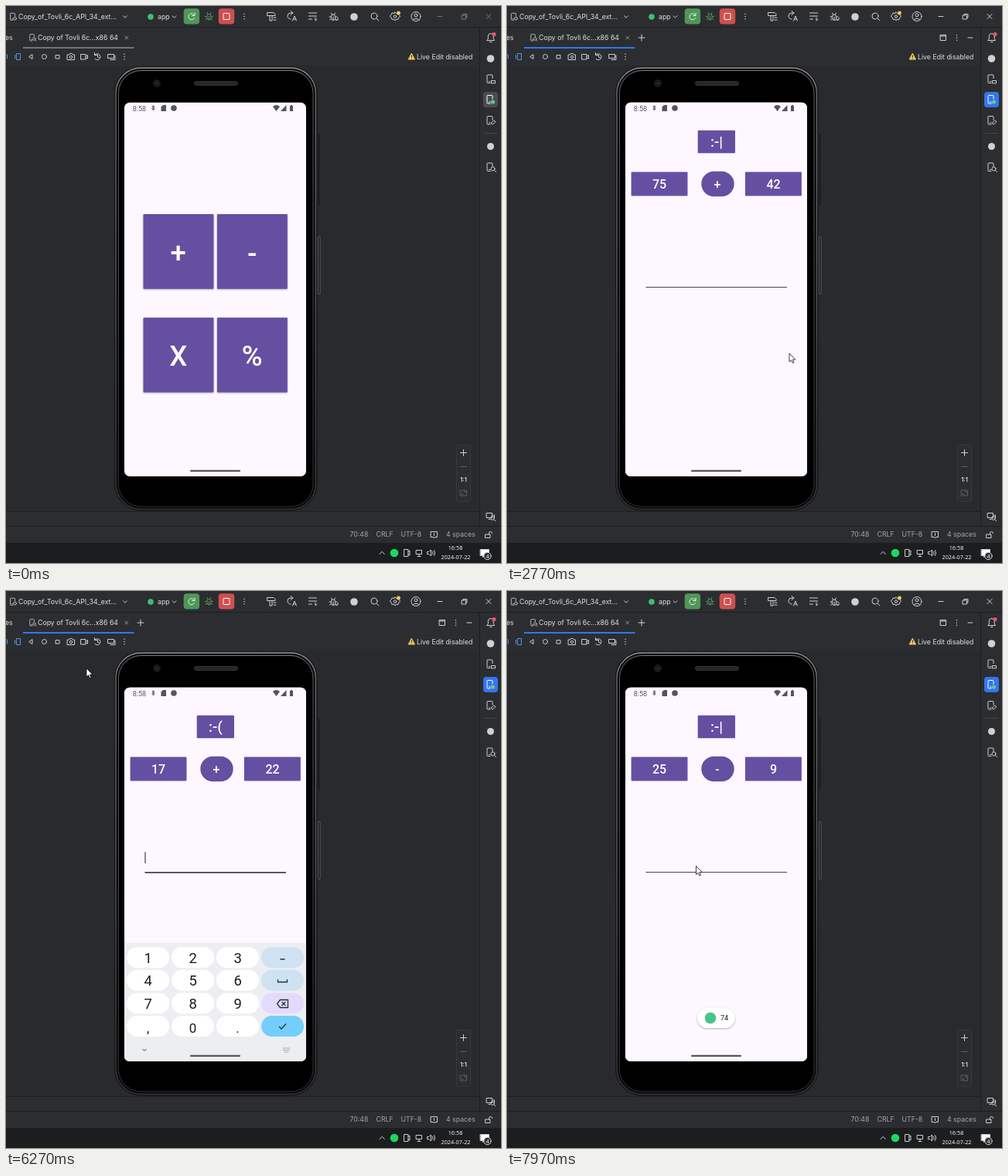
An HTML page for the animation above (8000 ms loop, 640 by 720 pixels).

```html
<!DOCTYPE html>
<html lang="en">
<head>
<meta charset="utf-8">
<title>Arithmetic app in an emulator</title>
<style>
html, body { margin: 0; width: 100%; height: 100%; overflow: hidden; background: #2b2d30; }
svg { display: block; width: 100vw; height: 100vh; }
text { font-family: Inter, "Open Sans", sans-serif; font-size: 8.75px; fill: #dfe1e5; stroke: none; white-space: pre; }
.line { fill: none; stroke: #ced0d6; stroke-width: 1; stroke-linecap: round; stroke-linejoin: round; }
.dim text { fill: #a4a7ae; }
.tray text { font: 7.3px "Open Sans", "Noto Sans", sans-serif; fill: #fff; text-anchor: middle; }
.phone text { font-family: Roboto, sans-serif; text-anchor: middle; fill: #fff; font-weight: 500; }
.phone .big text { font-size: 36.5px; }
.phone .mid text { font-size: 16px; }
.phone .keys text { font-size: 18.5px; font-weight: 400; fill: #1b1c1f; }
.btn { fill: #654fa1; }
.big .btn { filter: drop-shadow(0 1px 1px rgba(0,0,0,.25)); }
</style>
</head>
<body>
<svg viewBox="0 0 640 720" preserveAspectRatio="none">
  <defs>
    <path id="chev" d="M-2.4-1.2 0 1.2 2.4-1.2"/>
    <path id="dots" d="M0-3.2v.01M0 0v.01M0 3.2v.01" stroke-width="1.5"/>
    <path id="device" d="M3-1V-4.5Q3-5.5 2-5.5H-3Q-4-5.5-4-4.5V4Q-4 5-3 5H0M-1.5 3H0"/>
    <path id="bug" d="M-2.6-.5Q-2.6-3 0-3T2.6-.5V1.5Q2.6 4.5 0 4.5T-2.6 1.5ZM-1.5-3-2.5-5M1.5-3 2.5-5M-2.6 0H-5M2.6 0H5M-2.6 2.5-4.5 4M2.6 2.5 4.5 4M0 0V4"/>
    <path id="redo" d="M3.7-1A4 4 0 1 0 3.5 2M4-4.5V-1H.7"/>
    <clipPath id="screen"><rect x="153" y="124.700" width="235" height="483.300" rx="7"/></clipPath>
    <linearGradient id="rim" x2="0" y2="1">
      <stop offset="0" stop-color="#97989b"/><stop offset=".06" stop-color="#6c6d70"/>
      <stop offset=".5" stop-color="#58595c"/><stop offset="1" stop-color="#343537"/>
    </linearGradient>
  </defs>

  <rect width="640" height="720" fill="#2b2d30"/>
  <rect y="77" width="612" height="576" fill="#292a2e"/>
  <path d="M0 27.5H640M612.5 28V672M0 653.5H612M0 672.5H640" stroke="#1e1f22" fill="none"/>
  <rect y="694" width="640" height="26" fill="#1c1d1f"/>

  <!-- Main toolbar -->
  <g class="line">
    <g transform="translate(9 14) scale(.85)"><use href="#device"/><circle cx="3" cy="2.5" r="2.2"/></g>
    <text x="16" y="17">Copy_of_Tovli_6c_API_34_ext...</text>
    <use href="#chev" x="154" y="14"/>
    <circle cx="187" cy="14" r="3.8" fill="#3fbf6f" stroke="none"/>
    <text x="196" y="17">app</text>
    <use href="#chev" x="217.500" y="14"/>
    <rect x="229.700" y="3.200" width="20.400" height="20.400" rx="4" fill="#4f9659" stroke="none"/>
    <use href="#redo" x="240" y="13.500" stroke="#e8f3e9"/>
    <use href="#bug" x="262.500" y="13.500" stroke="#57965c"/>
    <rect x="274.800" y="3.200" width="20.400" height="20.400" rx="4" fill="#cf4f50" stroke="none"/>
    <rect x="281" y="9.500" width="8" height="8" rx="1" stroke="#fff"/>
    <use href="#dots" x="308" y="13.500"/>
    <path d="M338 8.500h8l2 2v2h-10zM341 12.500V19h3v-6.500M346 15h3M346 18h3"/>
    <path d="M371 9H368a4 4 0 1 0 0 8M368 6.500 371 9 368 11.500M370.500 19l2.500-6 2.500 6M371.500 17h3"/>
    <path d="M391.500 9h10M391.500 13h10M391.500 17h4M400 15v4l2-2"/>
    <use href="#bug" x="423" y="14"/><path d="M426 18h3v-3"/>
    <circle cx="450" cy="14" r="4.800" fill="#ced0d6" stroke="none"/>
    <circle cx="476" cy="13" r="4"/><path d="M479 16l3 3"/>
    <path d="M503 8l1.500 1.500 2.500-.5.800 2.300 2 1.700-2 2-.8 2.500-2.500-.5L503 19l-1.500-2-2.500.5-.8-2.500-2-2 2-1.700.8-2.300 2.500.5z"/>
    <circle cx="503" cy="13.500" r="1.700"/><circle cx="507.500" cy="9" r="2.500" fill="#f2c55c" stroke="none"/>
    <circle cx="530" cy="13.500" r="6"/><circle cx="530" cy="11.800" r="2"/><path d="M526 18q4-4 8 0"/>
    <path id="winBtns" d="M558 13.500h6M589.500 12h5v5h-5zM591 12v-1.500h5V15h-1.500M621 10.500l6 6M627 10.500l-6 6"/>
  </g>

  <!-- Tabs and emulator controls -->
  <g class="line">
    <text x="-1" y="44">es</text>
    <g transform="translate(34 41) scale(.8)"><use href="#device"/><circle cx="3" cy="2" r="2.200"/><path d="M5 4l1.500 1.500"/></g>
    <text x="41" y="44">Copy of Tovli 6c...x86 64</text>
    <path d="M153.800 39l4 4M157.800 39l-4 4" stroke="#8c8f96"/>
    <rect id="tabLine" x="22" y="53" width="143.500" height="2" stroke="none"/>
    <g id="hoverTools">
      <path d="M170 41h8M174 37v8M560.500 37.500h7v7h-7zM560.500 39h7M596 41h6"/>
      <use href="#dots" x="581.500" y="41"/>
    </g>
    <path d="M0 62.500q1.500 0 1.500 1.500v4M14 61.500h4.500v8H14zM11.500 63.500v4.500" stroke="#5b93ee"/>
    <path d="M34 63v5.500l-4-2.700zM64.500 63.500h4.500v4.500h-4.500z"/><circle cx="49.500" cy="65.500" r="3"/>
    <path d="M79.500 63h2l1-1.500h3l1 1.500h2v6.500h-9zM97 62.500h6v6.500h-6zM103 65l2.500-1.500v4.500L103 67"/><circle cx="84" cy="66" r="1.700"/>
    <path d="M115 63a4 4 0 1 1 0 5.500M114.500 60.500V63.500h3M118.500 63.500v2.500l2 1M132 62.500h7.500v5H132zM135 69.500h6V64"/>
    <use href="#dots" x="153" y="65.500"/>
    <path d="M524.500 61.500l4 7.500h-8z" fill="#f2c55c" stroke="#f2c55c"/><path d="M524.500 64v2M524.500 68v.01" stroke="#2b2d30"/>
    <text x="531" y="68.500">Live Edit disabled</text>
  </g>

  <!-- Right tool strip -->
  <rect id="activeTool" x="617" y="111" width="19" height="20" rx="4"/>
  <g class="line">
    <path d="M622 44.500h9.500l-1.200-2V39q0-3.500-3.500-3.500T623.300 39v3.500zM625.500 46.500h2.500"/><circle cx="631" cy="36.500" r="2.600" fill="#e55765" stroke="none"/>
    <circle cx="626.500" cy="68" r="4.800" fill="#ced0d6" stroke="none"/>
    <use href="#device" x="626" y="94.500"/><path d="M627.500 99.500v-3h5v3z"/>
    <use href="#device" x="626" y="121" stroke="#fff"/><circle cx="629.500" cy="124" r="2.600" fill="#64c97e" stroke="none"/>
    <use href="#device" x="626" y="148"/><path d="M627.500 151l3-3q2 0 2 2l-3 3q-2 0-2-2"/>
    <path d="M618 164.500h17" stroke="#43454a"/>
    <circle cx="626.500" cy="181.500" r="4.500" fill="#ced0d6" stroke="none"/>
    <use href="#device" x="626" y="208.500"/><circle cx="629.500" cy="210.500" r="2.500"/><path d="M631.500 212.500l2 2"/>
    <path d="M621.500 655.500h7v6h-7zM624 663.500h2M630 658h1.500v3"/><circle cx="629" cy="662" r="2.300"/><path d="M630.800 663.800l2 2"/>
  </g>

  <!-- Zoom panel -->
  <rect x="582.500" y="567.500" width="18" height="73" rx="2" fill="#2b2d30" stroke="#37393d"/>
  <g class="line">
    <path d="M587.500 577.500h8M591.500 573.500v8"/><path d="M587.500 595.500h8M587.500 626h8v7h-8zM589.500 630v1.500h1.500M592.500 627.500h1.500v1.500" stroke="#5a5d63"/>
    <text x="591.500" y="614.500" text-anchor="middle" style="font-size:7.500px;font-weight:600">1:1</text>
  </g>

  <!-- Status bar and system tray -->
  <g class="line dim">
    <text x="444.500" y="686">70:48</text><text x="478.500" y="686">CRLF</text>
    <text x="510.500" y="686">UTF-8</text><text x="569" y="686">4 spaces</text>
    <path d="M549.500 679.500h8v7h-3l-1 1.500-1-1.500h-3zM553.500 681.500v3M620 683h6v4.500h-6zM624.500 683v-1.500q0-2 2-2t2 2"/>
  </g>
  <g class="line tray">
    <path d="M483 708.500l3.200-3.200 3.200 3.200"/>
    <circle cx="502" cy="707" r="5.300" fill="#1ed760" stroke="none"/>
    <path d="M515 702.500h5v9h-5zM520 705l2-1v6l-2-1M530.500 703.500h7v5h-7zM534 708.500v3M532 711.500h4M545 705.500h2l2.500-2.500v8l-2.500-2.500h-2zM551.500 705q1.500 2 0 4M553.500 703.500q2.500 3.500 0 7"/>
    <text x="581" y="703">16:58</text><text x="581.500" y="715">2024-07-22</text>
    <path d="M613.500 702.500h11v8h-6l-2 2v-2h-3z" fill="#fff"/><circle cx="622.500" cy="711" r="4.700" fill="#303236"/>
    <text x="622.500" y="713.800">4</text>
  </g>

  <!-- Phone -->
  <g class="phone">
    <path d="M404.500 165V258" stroke="#17181a" stroke-width="1.500"/>
    <rect x="403.500" y="298" width="2.500" height="74.500" rx="1" fill="#17181a" stroke="#77787b" stroke-width=".7"/>
    <rect x="140.500" y="78.500" width="261.500" height="573.500" rx="34" fill="#0b0b0c" stroke="#151516"/>
    <rect x="142" y="80" width="258.500" height="570.500" rx="32.500" fill="none" stroke="url(#rim)" stroke-width="1.400"/>
    <rect x="145.500" y="83.500" width="251.500" height="563.500" rx="29" fill="#000" stroke="url(#rim)" stroke-width=".8"/>
    <rect x="243.500" y="97.500" width="56" height="5" rx="2.500" fill="#262627" stroke="#333"/>
    <circle cx="195" cy="100" r="4.300" fill="#15171d" stroke="#24262c"/><circle cx="195" cy="100" r="1.800" fill="#272c3c"/>
    <g clip-path="url(#screen)">
      <rect x="153" y="124" width="235" height="484" fill="#fdf8ff"/>
      <g id="menu" class="big"></g>
      <g id="play">
        <rect x="153" y="124" width="235" height="484" fill="#fdf8ff"/>
        <g class="mid">
          <rect class="btn" x="246.700" y="160.700" width="48.300" height="29.500" rx="1"/>
          <text id="face" x="271" y="182" style="font-size:19px"></text>
          <rect class="btn" x="160.600" y="214.600" width="72.900" height="30.800" rx="1"/><text id="left" x="197" y="236"></text>
          <rect class="btn" x="251.300" y="213.800" width="42.400" height="32.400" rx="16.200"/><text id="sign" x="272" y="236"></text>
          <rect class="btn" x="307.900" y="214.600" width="73" height="30.800" rx="1"/><text id="right" x="344.500" y="236"></text>
        </g>
        <rect id="rule" x="179.500" y="363" width="182.500" fill="#49464e"/>
        <text id="answer" x="179.500" y="349" style="font-size:11px;font-weight:400;fill:#1d1b20;text-anchor:start"></text>
        <rect id="caret" y="337.500" width="1" height="14.500" fill="#1d1b20"/>
      </g>
      <g id="keyboard" class="keys"><rect x="153" y="455" width="235" height="160" fill="#edeef2"/></g>
      <g id="toast">
        <rect x="246" y="539" width="49" height="26" rx="13" fill="#fff" style="filter:drop-shadow(0 1px 1px rgba(0,0,0,.3))"/>
        <circle cx="263" cy="552" r="7.300" fill="#45c48b"/>
        <text x="281" y="555.300" style="font-size:9px;font-weight:400;fill:#1d1b20">74</text>
      </g>
      <g fill="#56535a">
        <text x="172.500" y="135.500" style="font-size:9px;font-weight:400;fill:#56535a">8:58</text>
        <path d="M190.500 128l2 2-1 1.500 1.500 1.500-1.500 1-1 2-1-2-1.500-1 1.500-1.500-1-1.500z" opacity=".75"/>
        <path d="M203 128h4v8h-6.500v-5.500z"/><circle cx="217" cy="132" r="3.800"/>
        <path d="M345 130q4.500-4 9 0l-4.500 6zM362.500 128v8h-7.500zM367 129h1v-1h2v1h1v7h-4z"/>
      </g>
      <rect x="238" y="599.700" width="65" height="2.300" rx="1.100" fill="#57545a"/>
    </g>
  </g>

  <path id="cursor" d="M0 0V11L2.600 8.700 4.300 12.500 6 11.700 4.400 8H7.800Z" fill="#fff" stroke="#111" stroke-width=".8"/>
</svg>

<script>
const LOOP = 8000;
const $ = id => document.getElementById(id);
const clamp = v => Math.min(1, Math.max(0, v));
const ramp = (t, from, span) => clamp((t - from) / span);
const smooth = p => p * p * (3 - 2 * p);
const settle = p => 1 - (1 - p) ** 4;

// Four large operator buttons
$('menu').innerHTML = [...'+-X%'].map((c, i) => {
  const x = 177.5 + (i % 2) * 95.4, y = 269 + (i >> 1) * 133.7;
  return `<rect class="btn" x="${x}" y="${y}" width="91" height="96.800" rx="1"/>
    <text x="${x + 45.3}" y="${y + 62.500}">${c}</text>`;
}).join('');

// Number pad: four columns, four rows, symbols in the last column
const tints = ['#cfe2f2', '#cfe2f2', '#e4dbfc', '#74cefb'];
const glyphs = ['M354.500 476h6', 'M351.500 502v3.500h12V502',
  'M350.500 533.500l4-5h10v10h-10zM356.500 531l5 5M361.500 531l-5 5', 'M353 563l3 3 6-6.500'];
const labels = '123456789,0.';
let pad = '';
for (let row = 0; row < 4; row++) {
  for (let col = 0; col < 4; col++) {
    const x = 183.6 + col * 58, y = 473.7 + row * 29.6;
    pad += `<rect x="${x - 27.5}" y="${y - 13.500}" width="55" height="27" rx="13.500" fill="${col < 3 ? '#fff' : tints[row]}"/>`;
    if (col < 3) pad += `<text x="${x}" y="${y + (row < 3 ? 7 : 8)}"${row < 3 ? '' : ' style="font-size:17px"'}>${labels[row * 3 + col]}</text>`;
  }
}
pad += `<path d="${glyphs.join('')}" fill="none" stroke="#24303a" stroke-width="1.300"/>
  <path d="M176.500 592l2.500 2.500 2.500-2.500" fill="none" stroke="#44474d"/>
  <path d="M358 591h9M358 593.500h9M360 596h5" stroke="#7b7e84" stroke-width="1.200" stroke-dasharray="1.200 .8"/>`;
$('keyboard').innerHTML += pad;

// Pointer stops: time, x, y
const path = [
  [300, -9, 400], [560, 222, 322], [640, 222, 322], [900, 203.5, 340], [2380, 203.5, 340],
  [2740, 365, 449], [2810, 365, 449], [3000, 262, 345], [3090, 262, 345],
  [3320, 184, 474], [3500, 184, 474], [3640, 184, 531], [3720, 184, 531],
  [3970, 289, 548], [4130, 356, 560], [4240, 356, 560], [4530, 242, 503], [4600, 242, 503],
  [4740, 184, 503], [4800, 184, 503], [5060, 356, 560], [5150, 356, 560],
  [5400, 184, 531], [5460, 184, 531], [5600, 242, 560], [5660, 242, 560],
  [5860, 356, 560], [5930, 356, 560], [6080, 268, 550], [6140, 268, 550],
  [6270, 104, 100], [6400, 30, 62], [6980, 30, 62], [7270, 222, 305],
  [7430, 308, 317], [7520, 308, 317], [7850, 244.5, 355.5], [LOOP, 244.5, 355.5]
];
const rounds = [
  [0, '75+42', ':-|'], [4180, '23+31', ':-)'], [5100, '48+26', ':-)'],
  [5900, '17+22', ':-('], [7400, '25-9', ':-|']
];
const typed = [
  [0, ''], [3360, '1'], [3480, '11'], [3680, '117'], [4180, ''], [4570, '5'], [4770, '54'],
  [5100, ''], [5430, '7'], [5630, '70'], [5900, '']
];
const FOCUS = 590, OPEN = 620, EDIT = 3060, HIDE = 6480, CLOSE = 6950, REOPEN = 7480;

const latest = (list, t) => list.filter(e => e[0] <= t).pop();

function pointer(t) {
  const i = path.findIndex(p => p[0] >= t);
  if (i < 1) return null;
  const [t0, x0, y0] = path[i - 1], [t1, x1, y1] = path[i];
  const p = smooth((t - t0) / (t1 - t0));
  return [x0 + (x1 - x0) * p, y0 + (y1 - y0) * p];
}

// How far the exercise screen has slid in, and how opaque it is
function opening(t) {
  if (t >= CLOSE && t < REOPEN)
    return [1 - settle(ramp(t, CLOSE, 450)), 1 - ramp(t, CLOSE + 35, 83)];
  const start = t < CLOSE ? OPEN : REOPEN;
  return [settle(ramp(t, start, 450)), ramp(t, start + 50, 83)];
}

function render(t) {
  const focused = t >= FOCUS;
  $('tabLine').setAttribute('fill', focused ? '#3574f0' : '#6f737a');
  $('activeTool').setAttribute('fill', focused ? '#3574f0' : '#4a4c51');
  $('hoverTools').setAttribute('visibility', focused ? 'visible' : 'hidden');
  $('winBtns').setAttribute('stroke', focused ? '#ced0d6' : '#777a81');

  const [slid, alpha] = opening(t);
  $('menu').setAttribute('transform', `translate(${-23.5 * slid} 0)`);
  $('play').setAttribute('transform', `translate(${23.5 * (1 - slid)} 0)`);
  $('play').setAttribute('opacity', alpha);

  const [, sum, face] = latest(rounds, t);
  const [, left, sign, right] = sum.match(/(\d+)(\D)(\d+)/);
  const [since, answer] = latest(typed, t);
  Object.entries({ left, sign, right, face, answer }).forEach(([id, s]) => {
    if ($(id).textContent !== s) $(id).textContent = s;
  });

  const editing = t >= EDIT && t < REOPEN;
  const blinkOn = (t - Math.max(since, EDIT)) % 1000 < 500;
  $('rule').setAttribute('height', editing ? 1.8 : 1);
  $('caret').setAttribute('x', 179.5 + answer.length * 6.2);
  $('caret').setAttribute('visibility', editing && blinkOn ? 'visible' : 'hidden');

  const up = settle(ramp(t, EDIT + 20, 260)) - smooth(ramp(t, HIDE, 220));
  $('keyboard').setAttribute('transform', `translate(0 ${155 * (1 - up)})`);

  const shown = smooth(ramp(t, 7000, 160));
  $('toast').setAttribute('opacity', shown);
  $('toast').setAttribute('transform', `translate(0 ${8 * (1 - shown)})`);

  const at = pointer(t);
  $('cursor').setAttribute('visibility', at ? 'visible' : 'hidden');
  if (at) $('cursor').setAttribute('transform', `translate(${at})`);
}

const begin = performance.now();
function tick() {
  render((performance.now() - begin) % LOOP);
  requestAnimationFrame(tick);
}
tick();
</script>
</body>
</html>
```
